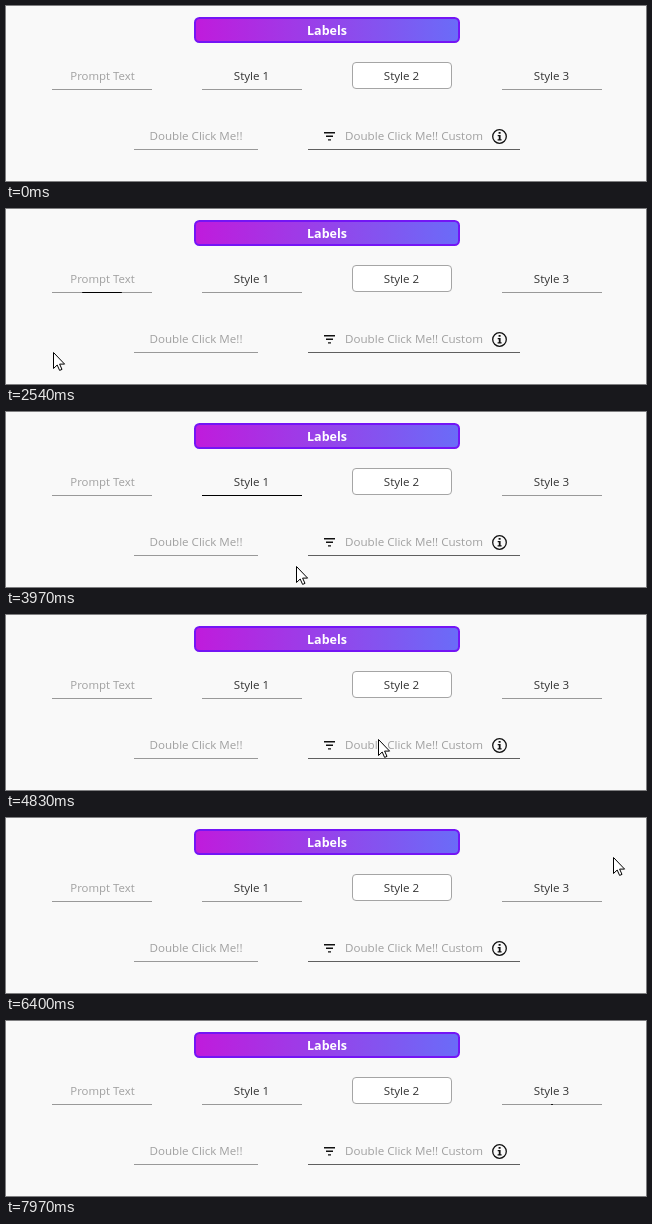
An HTML page for the animation above (7990 ms loop, 640 by 175 pixels).

```html
<!DOCTYPE html>
<html lang="en">
<head>
<meta charset="utf-8">
<title>Labels</title>
<style>
  html, body { margin: 0; width: 100%; height: 100%; overflow: hidden; background: #f9f9f9; }
  svg { display: block; width: 640px; height: 175px; }
  text { font: 11.6px "Open Sans", "Noto Sans", sans-serif; text-anchor: middle; fill: #333; }
  .prompt { fill: #a0a0a0; }
  .title { font-size: 12.5px; font-weight: 700; fill: #fff; }
  .line { fill: #999; }
</style>
</head>
<body>
<svg viewBox="0 0 640 175">
  <defs>
    <linearGradient id="banner">
      <stop stop-color="#c01bdc"/>
      <stop offset="1" stop-color="#6a6cf8"/>
    </linearGradient>
  </defs>
  <rect x="189" y="12" width="264" height="24" rx="4.5" fill="url(#banner)" stroke="#7415f5" stroke-width="2"/>
  <text class="title" x="321" y="29">Labels</text>

  <text class="prompt" x="96.5" y="74" style="font-size:11.4px">Prompt Text</text>
  <rect class="line" x="46" y="83" width="100" height="1"/>
  <text x="245.5" y="74">Style 1</text>
  <rect class="line" x="196" y="83" width="100" height="1"/>
  <rect id="outline" x="346.5" y="56.5" width="99" height="26" rx="3.5" fill="#fff"/>
  <text x="395.5" y="74">Style 2</text>
  <text x="545.5" y="74">Style 3</text>
  <rect class="line" x="496" y="83" width="100" height="1"/>

  <text class="prompt" x="190" y="134">Double Click Me!!</text>
  <rect class="line" x="128" y="143" width="124" height="1"/>
  <text class="prompt" x="408" y="134">Double Click Me!! Custom</text>
  <rect x="302" y="143" width="212" height="1" fill="#606060"/>
  <path d="M318 126.7h11M320 130.3h7M322 133.9h3" stroke="#111" stroke-width="1.4"/>
  <circle cx="493.5" cy="130.5" r="6.8" fill="none" stroke="#111" stroke-width="1.3"/>
  <path d="M492.6 126h2v1.8h-2zM491.7 129h2.9v4.3h1v1.2h-4v-1.2h1.2v-3.1h-1.1z" fill="#111"/>

  <g id="accents"></g>
  <path id="cursor" d="M.5.5V16.5L4.2 13 6.6 18.4 9 17.4 6.6 12.1H11.6Z" fill="#fff" stroke="#000"/>
</svg>
<script>
const LOOP = 7990, FADE = 300;

// Pointer tip: time, x, y
const path = [
  [930, 162, -18], [1280, 116, 73], [1580, 116, 73], [1740, 120, 61], [1900, 106, 68],
  [2060, 88, 85], [2360, 49, 138], [2440, 35, 141], [2540, 47, 143], [2720, 92, 141],
  [3160, 247, 88], [3310, 263, 76], [3460, 260, 61], [3700, 270, 66], [3900, 281, 80],
  [3970, 290, 154], [4050, 295, 162], [4240, 295, 162], [4830, 372, 124], [5030, 391, 75],
  [5350, 408, 65], [5580, 446, 56], [5840, 560, 34], [5980, 592, 26], [6180, 607, 39],
  [6400, 607, 39], [6700, 578, 71], [6860, 578, 71], [7040, 587, 59], [7280, 581, 76],
  [7370, 577, 133], [7670, 577, 133], [7860, 587, 176]
];

// Hover accents: when each starts to appear and to withdraw
const underlines = [
  { x: 96, show: 1580, hide: 2360 },
  { x: 246, show: 3480, hide: 4240 },
  { x: 546, show: 6860, hide: 7676 }
];
const outlineHover = { show: 5350, hide: 5880 };

const clamp = v => Math.min(1, Math.max(0, v));
const hover = (t, { show, hide }) => clamp((t - show) / FADE) - clamp((t - hide) / FADE);

const slope = (i, k) => (path[i + 1][k] - path[i][k]) / (path[i + 1][0] - path[i][0]);

// Harmonic mean of neighbouring slopes keeps the curve free of overshoot
function tangent(i, k) {
  if (i === 0) return slope(0, k);
  if (i === path.length - 1) return slope(i - 1, k);
  const a = slope(i - 1, k), b = slope(i, k);
  return a * b > 0 ? 2 * a * b / (a + b) : 0;
}

function pointer(t) {
  const i = path.findIndex((p, n) => n < path.length - 1 && t >= p[0] && t < path[n + 1][0]);
  if (i < 0) return null;
  const h = path[i + 1][0] - path[i][0], u = (t - path[i][0]) / h, v = 1 - u;
  return [1, 2].map(k =>
    path[i][k] * v * v * (1 + 2 * u) + path[i + 1][k] * u * u * (3 - 2 * u) +
    h * u * v * (v * tangent(i, k) - u * tangent(i + 1, k)));
}

const byId = id => document.getElementById(id);
const cursor = byId("cursor"), outline = byId("outline");

for (const line of underlines) {
  line.node = document.createElementNS("http://www.w3.org/2000/svg", "rect");
  line.node.setAttribute("y", 83);
  line.node.setAttribute("height", 1);
  byId("accents").append(line.node);
}

function draw(now) {
  const t = now % LOOP;
  for (const line of underlines) {
    const half = 50 * hover(t, line);
    line.node.setAttribute("x", line.x - half);
    line.node.setAttribute("width", 2 * half);
  }
  const grey = Math.round(165 * (1 - hover(t, outlineHover)));
  outline.setAttribute("stroke", `rgb(${grey},${grey},${grey})`);

  const tip = pointer(t);
  cursor.setAttribute("visibility", tip ? "visible" : "hidden");
  if (tip) cursor.setAttribute("transform", `translate(${tip.map(Math.round)})`);
}

const start = performance.now();
function tick() {
  draw(performance.now() - start);
  requestAnimationFrame(tick);
}
tick();
</script>
</body>
</html>
```
